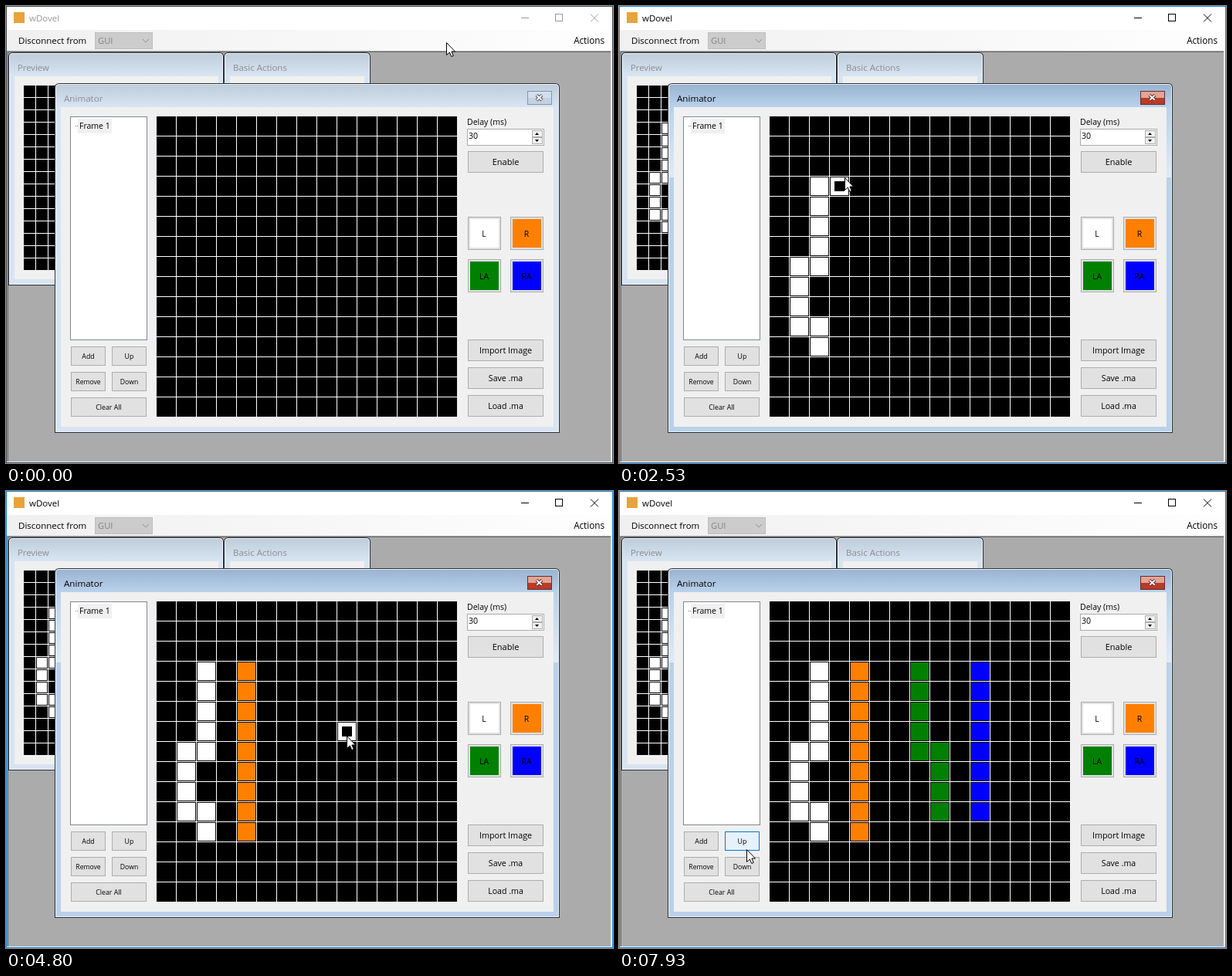
These frames come from a looping animation (786 px wide and 592 px high, 8000 ms). An HTML page:

```html
<!DOCTYPE html>
<html lang="en">
<head>
<meta charset="utf-8">
<title>Animator</title>
<style>
html, body { margin: 0; width: 100%; height: 100%; overflow: hidden; background: #fff; }
svg {
  display: block; width: 786px; height: 592px; shape-rendering: crispEdges;
  font-family: "Open Sans", "Noto Sans", sans-serif;
  --edge: #434e5c; --title: #999; --capTop: #bfcddb; --capLow: #d7e4f2;
  --caption: #8c8c8c; --shine: #d7e4f2;
  --shutTop: #d3dfec; --shutLow: #c3d1e1; --shutEdge: #8496ab; --mark: #4a525e;
}
svg.active {
  --edge: #1883d7; --title: #000; --capTop: #99b4d1; --capLow: #b9d1ea;
  --caption: #000; --shine: #dfebf7;
  --shutTop: #e2a596; --shutLow: #bb3a28; --shutEdge: #6b2a2a; --mark: #5a2b2b;
}
text { white-space: pre; }
.smooth { shape-rendering: geometricPrecision; }
</style>
</head>
<body>
<svg id="stage" viewBox="0 0 786 592">
  <defs>
    <linearGradient id="menu"><stop stop-color="#f0f0f0"/><stop offset="1" stop-color="#fefefe"/></linearGradient>
    <linearGradient id="idle" x2="0" y2="1"><stop stop-color="#bfcddb"/><stop offset="1" stop-color="#d7e4f2"/></linearGradient>
    <linearGradient id="cap" x2="0" y2="1"><stop style="stop-color:var(--capTop)"/><stop offset="1" style="stop-color:var(--capLow)"/></linearGradient>
    <linearGradient id="shine" x2="0" y2="1"><stop style="stop-color:var(--capLow)"/><stop offset="1" style="stop-color:var(--shine)"/></linearGradient>
    <linearGradient id="shut" x2="0" y2="1"><stop style="stop-color:var(--shutTop)"/><stop offset=".5" style="stop-color:var(--shutTop)"/><stop offset=".5" style="stop-color:var(--shutLow)"/><stop offset="1" style="stop-color:var(--shutLow)"/></linearGradient>
  </defs>
</svg>
<script>
const LOOP = 8000, STEP = 200 / 3, COUNT = 15;
const WHITE = '#fff', ORANGE = '#ff8000', GREEN = '#008000', BLUE = '#0000ff';
const stage = document.getElementById('stage');

function add(tag, attrs, parent = stage) {
  const node = document.createElementNS('http://www.w3.org/2000/svg', tag);
  for (const key in attrs) node.setAttribute(key, attrs[key]);
  return parent.appendChild(node);
}
const rect = (x, y, width, height, fill) => add('rect', { x, y, width, height, style: 'fill:' + fill });
function box(x, y, w, h, fill, edge) {
  rect(x, y, w, h, edge);
  return rect(x + 1, y + 1, w - 2, h - 2, fill);
}
function line(d, color, width = 1) {
  return add('path', { d, class: 'smooth', style: `fill:none;stroke:${color};stroke-width:${width}` });
}
function label(x, y, str, size = 11.5, color = '#000', anchor = 'start') {
  const node = add('text', { x, y, 'font-size': size, 'text-anchor': anchor, style: 'fill:' + color });
  node.textContent = str;
}
function button(x, y, w, h, str, size) {
  const edge = rect(x, y, w, h, '#adadad');
  const face = rect(x + 1, y + 1, w - 2, h - 2, '#e1e1e1');
  label(x + w / 2, y + h / 2 + size * .36, str, size, '#000', 'middle');
  return { edge, face };
}
function swatch(x, y, color, str) {
  box(x, y, 43, 43, '#e1e1e1', '#adadad');
  rect(x + 3, y + 3, 37, 37, color);
  label(x + 21, y + 26, str, 10.5, '#000', 'middle');
}
function panel(x, y, w, h, low, cap) {
  const shape = (d, r) => `M${x + d} ${y + h - d}V${y + r}Q${x + d} ${y + d} ${x + r} ${y + d}H${x + w - r}Q${x + w - d} ${y + d} ${x + w - d} ${y + r}V${y + h - d}Z`;
  add('path', { d: shape(0, 6), class: 'smooth', style: 'fill:#2b3036' });
  add('path', { d: shape(1, 6), class: 'smooth', style: 'fill:#eef4fa' });
  add('path', { d: shape(2, 6), class: 'smooth', style: 'fill:' + low });
  add('path', { d: `M${x + 2} ${y + 30}V${y + 6}Q${x + 2} ${y + 2} ${x + 6} ${y + 2}H${x + w - 6}Q${x + w - 2} ${y + 2} ${x + w - 2} ${y + 6}V${y + 30}Z`, class: 'smooth', fill: `url(#${cap})` });
}
function grid(x, y, pitch) {
  const size = pitch * COUNT - 1;
  rect(x + 1, y + 1, size, size, '#000');
  for (let i = 1; i < COUNT; i++) {
    rect(x + i * pitch, y + 1, 1, size, WHITE);
    rect(x + 1, y + i * pitch, size, 1, WHITE);
  }
  return { x, y, pitch };
}
const cell = (g, c, r, fill) =>
  rect(g.x + c * g.pitch + 2, g.y + r * g.pitch + 2, g.pitch - 3, g.pitch - 3, fill);

// Pointer path: time, x, y, eased
const path = [
  [0, 570, 47], [870, 252, 437, 1], [1200, 252, 437], [1340, 251, 418], [1420, 238, 408],
  [1650, 236, 342], [1720, 256, 336], [2067, 269, 236], [2267, 271, 228], [2467, 271, 228],
  [2533, 292, 222], [2933, 365, 225, 1], [3000, 365, 225], [3200, 311, 232, 1],
  [3533, 320, 283], [3867, 316, 398], [4067, 317, 442, 1], [4267, 317, 442],
  [4800, 441, 317, 1], [4933, 462, 262], [5067, 394, 231], [5133, 394, 231],
  [5500, 393, 336], [5600, 412, 340], [6000, 414, 418], [6600, 479, 238, 1],
  [6733, 478, 238], [6867, 474, 254], [7267, 475, 427], [7533, 475, 427], [7933, 165, 464, 1]
];
// Pressed spans: from, to, colour
const strokes = [[1060, 2300, WHITE], [3240, 4200, ORANGE], [5180, 6050, GREEN], [6660, 7300, BLUE]];

function pointer(t) {
  const i = path.findIndex(p => p[0] > t);
  if (i < 0) return path[path.length - 1].slice(1, 3);
  const a = path[i - 1], b = path[i];
  let k = (t - a[0]) / (b[0] - a[0]);
  if (b[3]) k = k * k * (3 - 2 * k);
  return [a[1] + (b[1] - a[1]) * k, a[2] + (b[2] - a[2]) * k];
}
function cellAt(x, y) {
  const c = Math.floor((x - 194) / 26), r = Math.floor((y - 142) / 26);
  return c >= 0 && c < COUNT && r >= 0 && r < COUNT ? [c, r] : null;
}
function paintLog() {
  const log = [], seen = new Set();
  for (const [from, to, color] of strokes)
    for (let t = from; t < to; t += 4) {
      const at = cellAt(...pointer(t));
      if (!at || seen.has(at.join())) continue;
      seen.add(at.join());
      log.push({ t, c: at[0], r: at[1], color });
    }
  return log;
}
const log = paintLog();

// Main window
rect(0, 0, 786, 592, 'var(--edge)');
rect(1, 1, 784, 590, WHITE);
rect(10, 8, 14, 14, '#e8a33a');
label(30, 20, 'wDovel', 11.5, 'var(--title)');
rect(667, 15, 10, 1, 'var(--title)');
box(711, 10, 10, 10, WHITE, 'var(--title)');
line('M757 10.5l10 10m0-10l-10 10', 'var(--title)');
rect(1, 31, 783, 27, 'url(#menu)');
label(16, 49, 'Disconnect from');
box(115, 34, 75, 22, '#cccccc', '#bfbfbf');
label(119, 49, 'GUI', 11.2, '#838383');
line('M177 43l4 4 4-4', '#929292');
label(775, 49, 'Actions', 11.7, '#000', 'end');
rect(1, 58, 783, 533, '#a0a0a0');
rect(2, 59, 782, 532, '#696969');
rect(3, 60, 781, 530, '#ababab');
rect(1, 590, 783, 1, '#f4f4f4');
rect(783, 58, 2, 533, '#f4f4f4');

// Preview and Basic Actions
panel(3, 60, 279, 302, '#d7e4f2', 'idle');
rect(11, 91, 264, 263, '#f0f0f0');
label(15, 84, 'Preview', 11.3, '#8c8c8c');
const small = grid(22, 102, 16);
for (const p of log) if (p.c < 3) p.copy = cell(small, p.c, p.r, p.color);
panel(282, 60, 190, 302, '#d7e4f2', 'idle');
rect(290, 91, 174, 263, '#f0f0f0');
label(294, 84, 'Basic Actions', 11.5, '#8c8c8c');

// Animator
panel(63, 100, 654, 453, 'var(--capLow)', 'cap');
rect(65, 130, 6, 92, 'url(#shine)');
rect(709, 130, 6, 92, 'url(#shine)');
rect(71, 131, 638, 414, '#f0f0f0');
label(75, 124, 'Animator', 11.6, 'var(--caption)');
box(675, 110, 32, 18, 'url(#shut)', 'var(--shutEdge)');
line('M687 115.5l7 6.5m0-6.5l-7 6.5', 'var(--mark)', 4);
line('M687.3 115.8l6.4 5.9m0-5.9l-6.4 5.9', WHITE, 2);

box(83, 143, 100, 290, WHITE, '#828790');
rect(93, 146, 44, 19, '#f0f0f0');
rect(90, 155, 1, 1, '#808080');
rect(92, 155, 1, 1, '#808080');
label(95, 159, 'Frame 1', 10.5);
button(84, 441, 45, 25, 'Add', 8.8);
const up = button(137, 441, 45, 25, 'Up', 8.8);
button(84, 474, 45, 25, 'Remove', 8.6);
button(137, 474, 45, 25, 'Down', 8.7);
button(84, 507, 98, 25, 'Clear All', 8.8);

label(597, 154, 'Delay (ms)', 10.5);
box(597, 159, 100, 22, WHITE, '#ababab');
label(599, 172, '30', 10.6);
for (const [y, d] of [[161, 'M685 167h5l-2.5-3z'], [170, 'M685 173h5l-2.5 3z']]) {
  box(681, y, 14, 9, '#f0f0f0', '#adadad');
  add('path', { d, class: 'smooth' });
}
button(598, 188, 98, 28, 'Enable', 11);
swatch(598, 273, WHITE, 'L');
swatch(653, 273, ORANGE, 'R');
swatch(598, 328, GREEN, 'LA');
swatch(653, 328, BLUE, 'RA');
button(598, 432, 98, 28, 'Import Image', 10.8);
button(598, 468, 98, 28, 'Save .ma', 10.6);
button(598, 504, 98, 28, 'Load .ma', 10.6);

const big = grid(194, 142, 26);
for (const p of log) {
  // A dark rim keeps painted cells apart from the grid lines
  p.node = cell(big, p.c, p.r, p.color);
}
const ring = rect(0, 0, 23, 23, WHITE), core = rect(0, 0, 13, 13, '#000');
const arrow = add('path', {
  d: 'M.5 .5V16.5L4.3 13 6.8 18.5 9.3 17.4 6.9 12H11.5Z', class: 'smooth',
  style: 'fill:#fff;stroke:#000;stroke-width:1'
});

const show = (node, on) => { node.style.display = on ? '' : 'none'; };
function place(node, x, y) {
  node.setAttribute('x', x);
  node.setAttribute('y', y);
}

function draw(time) {
  const t = Math.floor((time + 3.4) / STEP) * STEP + .01;
  const [x, y] = pointer(t).map(Math.round);
  stage.classList.toggle('active', t >= 1060);
  for (const p of log) {
    show(p.node, p.t <= t);
    if (p.copy) show(p.copy, p.t <= t);
  }
  const at = cellAt(x, y);
  show(ring, at);
  show(core, at);
  if (at) {
    const [c, r] = at, gx = 196 + c * 26, gy = 144 + r * 26;
    const paint = log.find(p => p.c === c && p.r === r && p.t <= t);
    place(ring, gx, gy);
    place(core, gx + 5, gy + 5);
    core.style.fill = paint ? paint.color : '#000';
  }
  const over = x >= 137 && x < 182 && y >= 441 && y < 466;
  up.edge.style.fill = over ? '#0078d7' : '#adadad';
  up.face.style.fill = over ? '#e5f1fb' : '#e1e1e1';
  arrow.setAttribute('transform', `translate(${x} ${y})`);
}

const start = performance.now();
function tick() {
  draw((performance.now() - start) % LOOP);
  requestAnimationFrame(tick);
}
tick();
</script>
</body>
</html>
```
